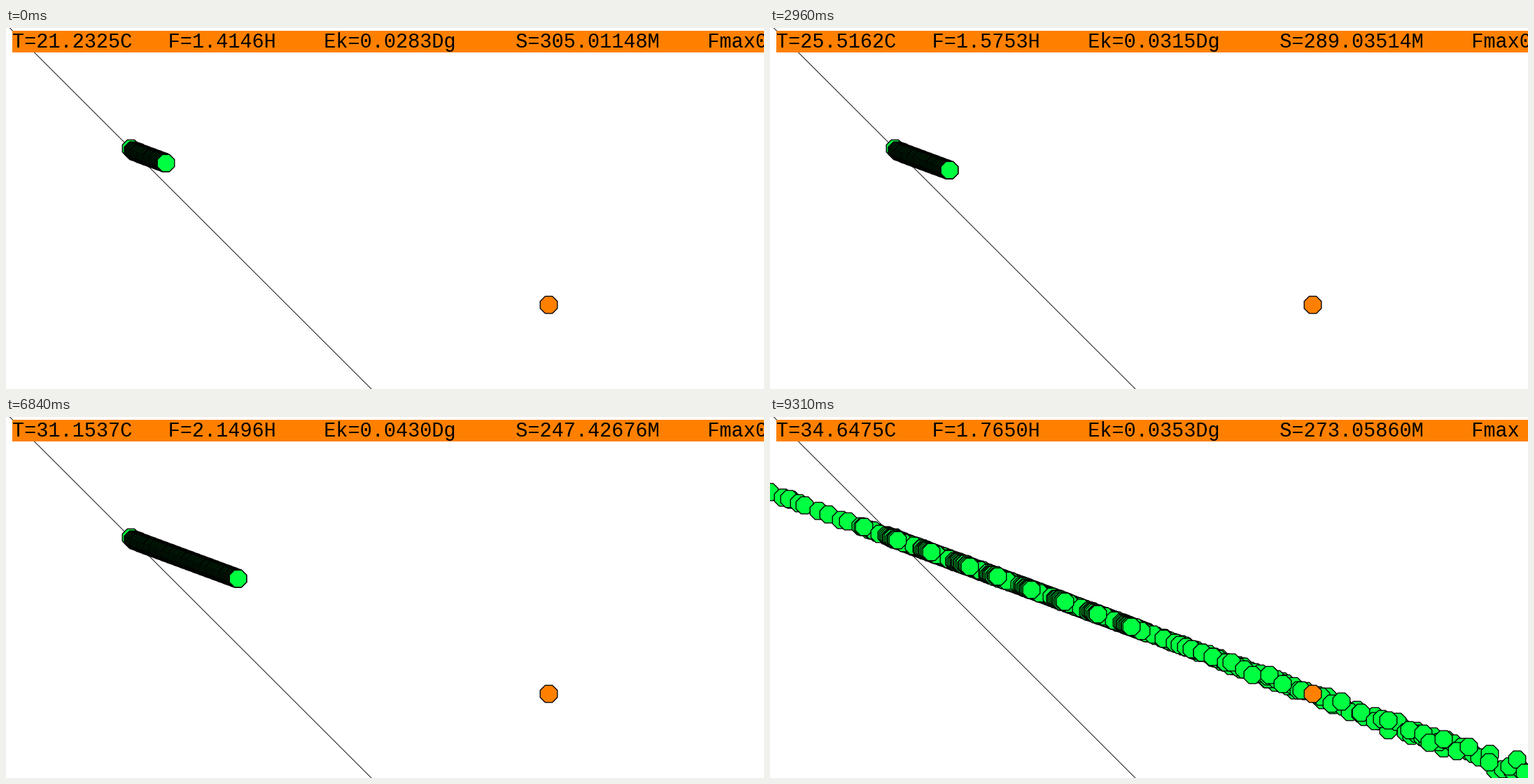
Animation of 1083 by 517 pixels, one loop 9.38 s. Source, as a matplotlib script:

```python
import numpy as np
import matplotlib.pyplot as plt
from matplotlib.animation import FuncAnimation
from matplotlib.patches import Rectangle

W, H, DPI = 1083, 517, 100
PT = 72 / DPI                       # points per pixel
LOOP, TICK, STEPS = 9380, 35, 121
GREEN, ORANGE = "#00ff40", "#ff8000"

SUN = (774.5, 396)
SLOPE = 0.3718                      # tilt of the flight path
UNIT = 0.5577                       # printed distance per horizontal pixel
PULL = 131600
SLOW, DENSE, WILD, LAST = 88, 94, 100, 120

# readings at a few steps; both counters run evenly between them
KEYS = [0, 25, 51, 67, SLOW, WILD, LAST]
TEMP = [21.2325, 24.0575, 26.9750, 28.7600, 31.1537, 32.4988, 34.6475]
DIST = [305.01148, 295.53003, 282.54026, 272.12130, 247.42676,
        239.82077, 273.05860]

rng = np.random.default_rng(7)


def path_y(x):
    return SUN[1] + SLOPE * (x - SUN[0])


def x_at(dist):
    return SUN[0] - dist / UNIT


def chain(a, b, lo, hi):
    """Hops of random length from a to b."""
    xs = a + np.cumsum(rng.uniform(lo, hi, 200))
    return xs[xs < b]


def glide(end):
    """Short close-set approach that stops at end."""
    return np.linspace(end - 14, end, 9)


def scatter_y(xs):
    spread = 0.5 + 0.013 * np.clip(xs - 600, 0, 400)
    return path_y(xs) + rng.normal(0, 1, len(xs)) * spread


def swings():
    out = [chain(600, 980, 10, 45), [30, 141], chain(150, 600, 6, 17),
           [330, 355, x_at(DIST[5])]]
    back = [chain(-12, 160, 7, 20), rng.uniform(130, 760, 120),
            chain(540, 1085, 6, 17), chain(600, 1085, 8, 30),
            chain(150, 540, 8, 18)]
    back += [glide(end) for end in np.linspace(182, 516, 8)]
    back += [glide(x_at(DIST[6]))]
    out, back = np.concatenate(out), np.concatenate(back)
    xs = np.concatenate([out, back])
    return len(out), np.column_stack([xs, scatter_y(xs)])


FIRST, SWINGS = swings()


def fall_x(k):
    if k <= SLOW:
        return x_at(np.interp(k, KEYS, DIST))
    u = min((k - SLOW) / (DENSE - SLOW), 1)
    start = x_at(DIST[4])
    return start + (540 - start) * u * u


def swing_count(k):
    return round(np.interp(k, [DENSE, WILD, LAST], [0, FIRST, len(SWINGS)]))


def fall_trail(x):
    xs = np.append(np.arange(180.5, x, 0.9), x)
    return np.column_stack([xs, path_y(xs)])


def readout(k, dist):
    force = PULL / dist ** 2
    temp = np.interp(k, KEYS, TEMP)
    return (f"T={temp:.4f}C".ljust(13)
            + f"F={force:.4f}H".ljust(13)
            + f"Ek={force / 50:.4f}Dg".ljust(16)
            + f"S={dist:.5f}M".ljust(16)
            + ("Fmax0" if k <= SLOW else "Fmax"))


fig = plt.figure(figsize=(W / DPI, H / DPI), dpi=DPI, facecolor="white")
ax = fig.add_axes([0, 0, 1, 1])
ax.set_xlim(0, W)
ax.set_ylim(H, 0)
ax.axis("off")


def balls(points, color, z):
    pts = np.array(points, float)
    return ax.scatter(pts[:, 0], pts[:, 1], s=(26.6 * PT) ** 2, c=color,
                      marker="8", edgecolors="black", linewidths=1.35 * PT,
                      antialiased=False, zorder=z)


ax.plot([0, W], [H - 0.5] * 2, color="#c0c0c0", lw=PT,
        antialiased=False, zorder=1)
ax.plot([4, 523], [-1.5, 518], color="black", lw=0.9 * PT, zorder=1)
balls([(177.5, 172)], GREEN, 2)
dots = balls([(228, 193)], GREEN, 3)
balls([SUN], ORANGE, 4)
ax.add_patch(Rectangle((9, 4), W, 30.5, fc=ORANGE, ec="none", zorder=5))
label = ax.text(9, 28, "", family="Liberation Mono", fontsize=28.66 * PT,
                va="baseline", zorder=6)


def draw(i):
    k = min(int(i * TICK * STEPS / LOOP + 0.44), LAST)
    x = fall_x(k)
    pts = fall_trail(x)
    n = swing_count(k)
    if n:
        pts = np.vstack([pts, SWINGS[:n]])
        x = SWINGS[n - 1, 0]
    dots.set_offsets(pts)
    label.set_text(readout(k, max(abs(SUN[0] - x) * UNIT, 5)))
    return dots, label


ani = FuncAnimation(fig, draw, frames=LOOP // TICK, interval=TICK,
                    repeat=True, repeat_delay=0, blit=False)
plt.show()
```
